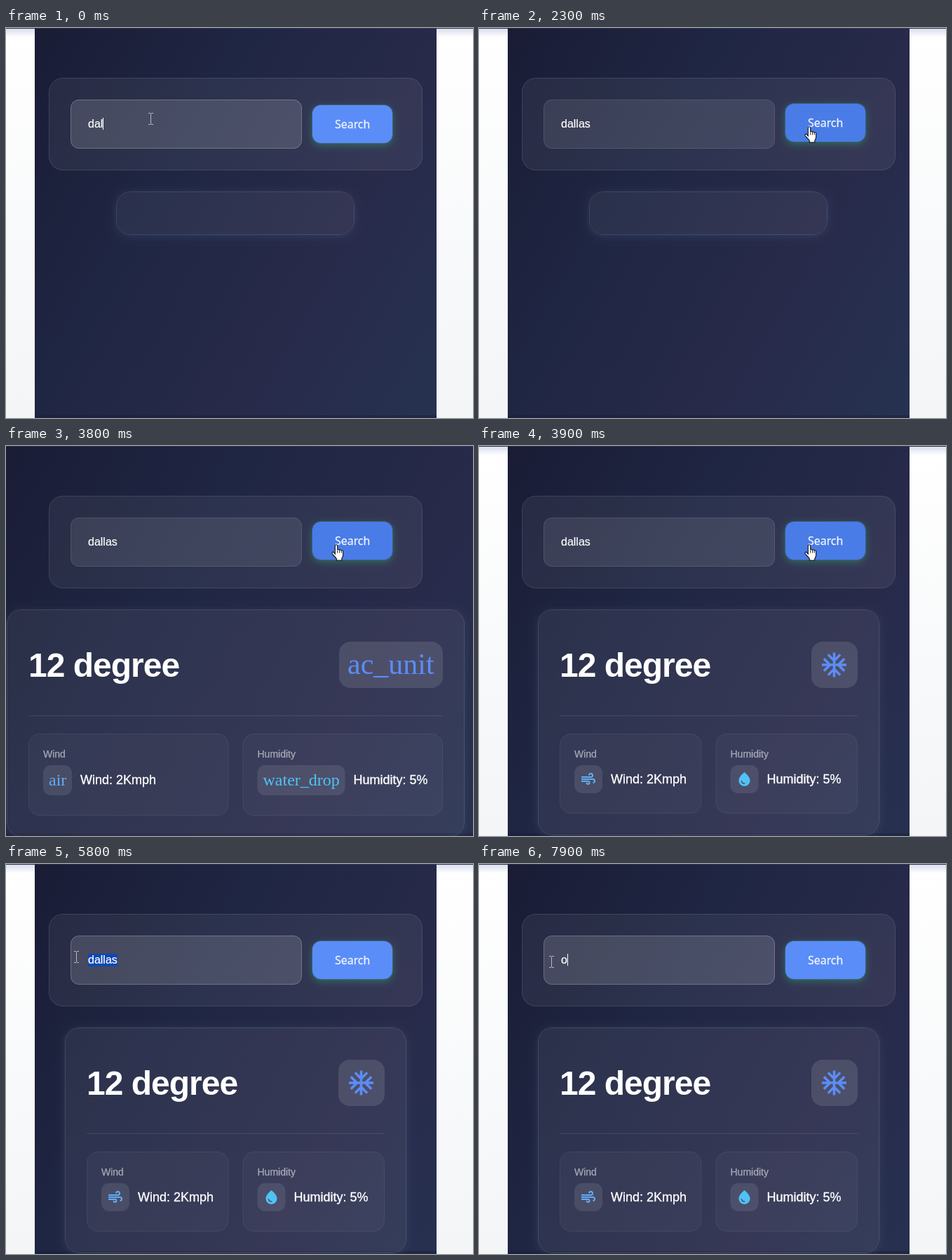
An HTML page with a canvas for the animation above (8000 ms loop, 666 by 556 pixels).

```html
<!DOCTYPE html>
<html lang="en">
<head>
<meta charset="utf-8">
<title>Weather search</title>
<style>
  html, body { margin: 0; width: 100%; height: 100%; overflow: hidden; background: #fff; }
  canvas { display: block; width: 666px; height: 556px; }
</style>
</head>
<body>
<canvas id="stage" width="666" height="556"></canvas>
<script>
const W = 666, H = 556, LOOP = 8000;
const ctx = document.getElementById('stage').getContext('2d', { alpha: false });

const SANS = '"Liberation Sans", Arial, sans-serif';
const SERIF = '"Liberation Serif", "Times New Roman", serif';
const UI = '"Open Sans", "Noto Sans", sans-serif';
const BLUE = '#5b8df8', AIR = '#62adf5', DROP = '#4fc3f7';

// Moments of the story, in ms
const BLUR = 1500, RESULT = 3800, ICONS = 3900, FOCUS = 5000, RETYPE = 7500;
const TYPED = [[0, 'dal'], [150, 'dall'], [300, 'dalla'], [450, 'dallas'], [RETYPE, 'o']];
const POINTER = [
  [0, 206, 129], [600, 206, 129], [1100, 389, 142], [1400, 472, 145],
  [1900, 471, 144], [2200, 470, 141], [4000, 470, 141], [4500, 196, 166],
  [4600, 196, 166], [4750, 188, 169], [4950, 166, 142],
  [5100, 165, 140], [5600, 100, 132], [5900, 100, 132], [6100, 103, 139]
];

const white = a => `rgba(255,255,255,${a})`;
const clamp = v => Math.max(0, Math.min(1, v));
const smooth = v => v * v * (3 - 2 * v);
const ramp = (t, start, len) => smooth(clamp((t - start) / len));
const mix = (a, b, k) => a + (b - a) * k;

function pointerAt(t) {
  const i = POINTER.findIndex(p => p[0] > t);
  if (i < 0) return POINTER[POINTER.length - 1].slice(1);
  const [t0, x0, y0] = POINTER[i - 1], [t1, x1, y1] = POINTER[i];
  const k = smooth((t - t0) / (t1 - t0));
  return [mix(x0, x1, k), mix(y0, y1, k)];
}

// A hairline stroke gives small text a medium weight
function text(str, x, y, font, color, { spacing = 0, weight = 0 } = {}) {
  ctx.font = font;
  ctx.letterSpacing = spacing + 'px';
  ctx.fillStyle = ctx.strokeStyle = color;
  ctx.fillText(str, x, y);
  if (weight) {
    ctx.lineWidth = weight;
    ctx.strokeText(str, x, y);
  }
  ctx.letterSpacing = '0px';
}

function fillRound(x, y, w, h, r, color) {
  ctx.beginPath();
  ctx.roundRect(x, y, w, h, r);
  ctx.fillStyle = color;
  ctx.fill();
}

function panel(x, y, w, h, r, fill, border) {
  fillRound(x, y, w, h, r, fill);
  ctx.beginPath();
  ctx.roundRect(x + .5, y + .5, w - 1, h - 1, r - .5);
  ctx.strokeStyle = border;
  ctx.lineWidth = 1;
  ctx.stroke();
}

// Shadow outside a translucent box only
function glow(x, y, w, h, r, color, blur, dy) {
  ctx.save();
  ctx.beginPath();
  ctx.rect(0, 0, W, H);
  ctx.roundRect(x, y, w, h, r);
  ctx.clip('evenodd');
  ctx.shadowColor = color;
  ctx.shadowBlur = blur;
  ctx.shadowOffsetY = dy;
  fillRound(x, y, w, h, r, '#000');
  ctx.restore();
}

function backdrop(left, right, height) {
  let g = ctx.createLinearGradient(0, 0, 0, H);
  g.addColorStop(0, '#ffffff');
  g.addColorStop(1, '#f3f5f7');
  ctx.fillStyle = g;
  ctx.fillRect(0, 0, W, H);
  g = ctx.createLinearGradient(0, 0, 0, 13);
  g.addColorStop(0, 'rgba(150,165,205,.4)');
  g.addColorStop(1, 'rgba(150,165,205,0)');
  ctx.fillStyle = g;
  ctx.fillRect(0, 0, W, 13);
  ctx.fillStyle = '#2b3447';
  ctx.fillRect(0, 0, W, 1);

  const dx = .87, dy = .5, len = (right - left) * dx + height * dy;
  g = ctx.createLinearGradient(left, 0, left + len * dx, len * dy);
  g.addColorStop(0, '#1a1c35');
  g.addColorStop(.35, '#1f2643');
  g.addColorStop(.67, '#282a4a');
  g.addColorStop(.83, '#272e4e');
  g.addColorStop(1, '#263250');
  ctx.fillStyle = g;
  ctx.fillRect(left, 0, right - left, H);
  ctx.fillStyle = white(.07);
  ctx.fillRect(left, 0, right - left, 1);
  ctx.fillStyle = 'rgba(20,22,45,.3)';
  ctx.fillRect(left, H - 4, right - left, 4);
}

function snowflake(cx, cy, size) {
  ctx.save();
  ctx.translate(cx, cy);
  ctx.scale(size / 24, size / 24);
  ctx.strokeStyle = BLUE;
  ctx.lineWidth = 2;
  ctx.beginPath();
  for (let i = 0; i < 4; i++) {
    ctx.moveTo(0, 0);
    ctx.lineTo(10, 0);
    ctx.moveTo(8.36, -4.95);
    ctx.lineTo(3.41, 0);
    ctx.lineTo(8.36, 4.95);
    ctx.rotate(Math.PI / 2);
  }
  ctx.stroke();
  ctx.restore();
}

const windPath = new Path2D('M2 15H11.5A2 2 0 1 1 9.5 17M2 9H15.5A2.5 2.5 0 1 0 13 6.5M2 12H18.5A2.5 2.5 0 0 1 18.5 17');
const dropPath = new Path2D('M12 2C6.7 6.5 4 10.5 4 13.8C4 18.8 7.8 22 12 22S20 18.8 20 13.8C20 10.5 17.3 6.5 12 2Z' +
  'M7.8 14Q8.4 14 8.6 14.6C9 16.9 10.9 17.6 12.2 17.5Q13 17.5 13 18.2Q13 18.9 12.3 19C10.1 19.1 7.7 17.9 7.1 14.9Q7 14 7.8 14Z');
const handPath = new Path2D('M5.3 14V2.4a1.7 1.7 0 0 1 3.4 0V8.6c0-1.5 2.9-1.4 2.9.3c0-1.4 2.7-1.2 2.7.6c0-1.2 2.4-.9 2.4.9V15c0 3-1 4-1.9 5.6V23H7.4V21C6 18.4 3 16 1.2 13.6C.2 11.8 2.2 10.4 3.6 11.8z');

function glyph(path, x, y, color, filled) {
  ctx.save();
  ctx.translate(x, y);
  if (filled) {
    ctx.fillStyle = color;
    ctx.fill(path, 'evenodd');
  } else {
    ctx.strokeStyle = color;
    ctx.lineWidth = 2;
    ctx.stroke(path);
  }
  ctx.restore();
}

function searchBar(t, pointer) {
  panel(61, 71, 533, 132, 20, white(.06), white(.1));

  const focus = 1 - ramp(t, BLUR, 300) + ramp(t, FOCUS, 300);
  panel(92, 102, 330, 70, 12, white(mix(.085, .135, focus)), white(mix(.1, .21, focus)));

  const word = TYPED.filter(k => k[0] <= t).pop();
  const font = '16px ' + SANS;
  ctx.font = font;
  const edge = n => 117 + ctx.measureText(word[1].slice(0, n)).width;
  const size = word[1].length;
  let first = size;
  if (t >= FOCUS + 100 && t < RETYPE) {
    while (first > 0 && (edge(first - 1) + edge(first)) / 2 > pointer[0]) first--;
  }
  if (first < size) {
    ctx.fillStyle = '#0d48b2';
    ctx.fillRect(edge(first), 128, edge(size) - edge(first), 18);
  }
  text(word[1], 117, 142, font, '#fff', { weight: .2 });

  const active = t < BLUR || t >= FOCUS;
  const since = t - Math.max(word[0], t >= FOCUS ? FOCUS : 0);
  if (active && first === size && since % 1000 < 500) {
    ctx.fillStyle = '#fff';
    ctx.fillRect(Math.round(edge(size)), 128, 1, 17);
  }

  const hover = ramp(t, 1280, 250) - ramp(t, 4050, 250);
  const y = 110 - 2 * hover;
  glow(437, y, 114, 54, 12, 'rgba(50,165,110,.5)', 11, 3);
  fillRound(436, y - 1, 116, 56, 13, 'rgba(60,125,165,.4)');
  const color = `rgb(${mix(91, 74, hover)},${mix(141, 124, hover)},${mix(248, 231, hover)})`;
  fillRound(437, y, 114, 54, 12, color);
  text('Search', 469, y + 33, '16px ' + UI, '#f4f7ff', { weight: .3 });
}

function detail(x, w, h, label, value, icon, color, iconW) {
  panel(x, 410, w, h, 16, white(.03), white(.06));
  text(label, x + 21, 444, '14px ' + SANS, '#a8aab8', { weight: .25 });
  const ready = !iconW, boxW = iconW || 40;
  fillRound(x + 21, 455, boxW, ready ? 40 : 43, 11, white(.095));
  if (ready) glyph(icon, x + 29, 463, color, icon === dropPath);
  else text(icon, x + 29, 484, '24px ' + SERIF, color);
  text(value, x + 33 + boxW, ready ? 481 : 482, '18px ' + SANS, '#fff', { weight: .35 });
}

function result(t) {
  const GLOW = 'rgba(75,110,150,.28)';
  if (t < RESULT) {
    glow(157, 233, 340, 62, 20, GLOW, 12, 2);
    panel(157, 233, 340, 62, 20, white(.055), white(.1));
    return;
  }
  const ready = t >= ICONS;
  const x = ready ? 84 : 1, w = ready ? 487 : 653;
  const left = x + 31, right = x + w - 31;
  const h = ready ? 322 : 324;
  glow(x, 233, w, h, 20, GLOW, 12, 2);
  panel(x, 233, w, h, 20, white(.065), white(.11));
  text('12 degree', left, 329, 'bold 48px ' + SANS, '#fff', { spacing: -1 });

  const boxW = ready ? 66 : 148;
  fillRound(right - boxW, 279, boxW, 66, 16, white(.115));
  if (ready) snowflake(right - 33.5, 312, 42);
  else text('ac_unit', right - boxW + 12, 325, '42px ' + SERIF, BLUE);

  ctx.fillStyle = white(.1);
  ctx.fillRect(left, 384, right - left, 1);

  const cardW = ready ? 202.5 : 285.5, cardH = ready ? 114 : 117;
  detail(left, cardW, cardH, 'Wind', 'Wind: 2Kmph', ready ? windPath : 'air', AIR, ready ? 0 : 41);
  detail(right - cardW, cardW, cardH, 'Humidity', 'Humidity: 5%', ready ? dropPath : 'water_drop', DROP, ready ? 0 : 125);
}

function hand(x, y) {
  ctx.save();
  ctx.translate(Math.round(x) - 6, Math.round(y) - 1);
  ctx.fillStyle = '#fff';
  ctx.fill(handPath);
  ctx.strokeStyle = '#111';
  ctx.lineWidth = 1.1;
  ctx.stroke(handPath);
  ctx.beginPath();
  for (const px of [8.7, 11.6, 14.3]) {
    ctx.moveTo(px, 9);
    ctx.lineTo(px, 12.5);
  }
  ctx.lineWidth = .9;
  ctx.stroke();
  ctx.restore();
}

function beam(x, y) {
  x = Math.round(x);
  y = Math.round(y);
  ctx.fillStyle = '#b9bac0';
  ctx.fillRect(x, y - 7, 1, 15);
  for (const dy of [-8, 8]) {
    ctx.fillRect(x - 3, y + dy, 3, 1);
    ctx.fillRect(x + 1, y + dy, 3, 1);
  }
}

function draw(t) {
  const wide = t >= RESULT && t < ICONS;
  const pointer = pointerAt(t);
  backdrop(wide ? -19 : 41, wide ? 674 : 614, t < RESULT ? H : 660);
  searchBar(t, pointer);
  result(t);
  const [x, y] = pointer;
  if (x >= 437 && x <= 551) hand(x, y);
  else beam(x, y);
}

const start = performance.now();
function tick(now) {
  draw(Math.max(0, now - start) % LOOP);
  requestAnimationFrame(tick);
}
draw(0);
requestAnimationFrame(tick);
</script>
</body>
</html>
```
